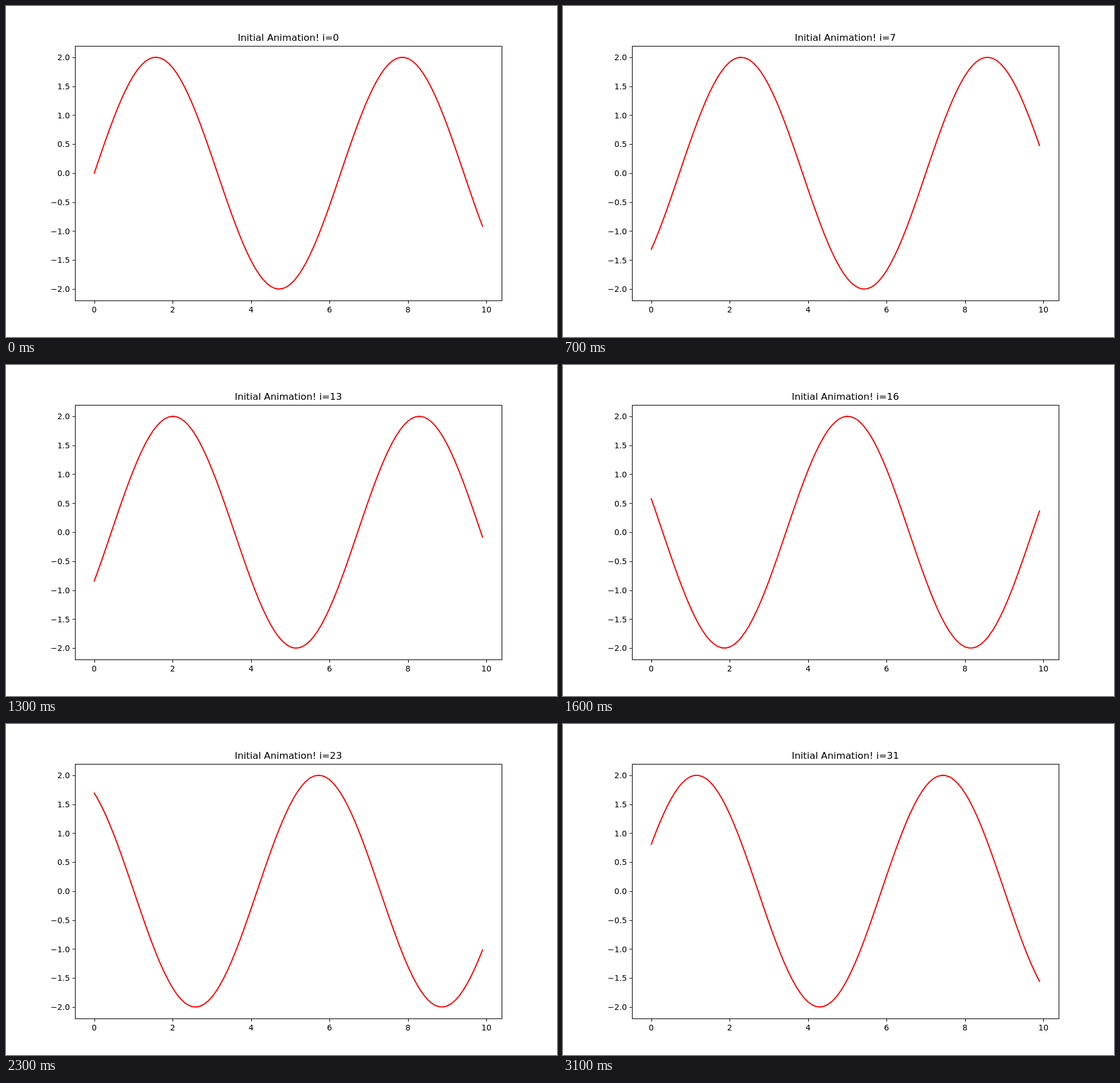
Write an HTML page that moves like this. It is 966x580 px and loops after 3.2 s.

```html
<!DOCTYPE html>
<html lang="en">
<head>
<meta charset="utf-8">
<title>Sine wave</title>
<style>
html, body { margin: 0; width: 100%; height: 100%; overflow: hidden; background: #fff; }
svg { display: block; }
text { font: 13.889px "DejaVu Sans", sans-serif; }
#title { font-size: 16.667px; }
</style>
</head>
<body>
<svg width="966" height="580" viewBox="0 0 966 580">
  <path id="curve" fill="none" stroke="#f00" stroke-width="2.083" stroke-linecap="square" stroke-linejoin="round"/>
  <path id="ticks" fill="none" stroke="#000" stroke-width="1.111"/>
  <rect x="121.5" y="70.5" width="748" height="446" fill="none" stroke="#000" stroke-width="1.111"/>
  <g id="labels"></g>
  <text id="title" x="495" y="61" text-anchor="middle"></text>
</svg>
<script>
const STEP = 100, STEPS = 32;
const box = { left: 120.75, right: 869.4, top: 69.6, bottom: 516.2 };
const xs = Array.from({ length: 100 }, (_, k) => k / 10);
const xTicks = [0, 2, 4, 6, 8, 10];
const yTicks = Array.from({ length: 9 }, (_, k) => k / 2 - 2);
const $ = id => document.getElementById(id);

// Linear scale fitted to the data with a 5% margin
function scale(values, from, to) {
  const lo = Math.min(...values), hi = Math.max(...values);
  const pad = (hi - lo) * 0.05;
  return v => from + (v - lo + pad) / (hi - lo + 2 * pad) * (to - from);
}

function addLabel(text, anchor, x, y) {
  const el = document.createElementNS("http://www.w3.org/2000/svg", "text");
  el.textContent = text;
  el.setAttribute("text-anchor", anchor);
  el.setAttribute("x", x);
  el.setAttribute("y", y);
  $("labels").append(el);
  return el;
}

const sx = scale(xs, box.left, box.right);
xTicks.forEach(v => addLabel(v, "middle", sx(v).toFixed(2), 537));
const xMarks = xTicks.map(v => `M${Math.round(sx(v)) + 0.5} 516.5v5`).join("");
const yLabels = yTicks.map(v =>
  addLabel(v.toFixed(1).replace("-", "\u2212"), "end", 112, 0));

function draw(i) {
  const ys = xs.map(x => 2 * Math.sin(x - i));
  const sy = scale(ys, box.bottom, box.top);
  $("curve").setAttribute("d", "M" + xs.map((x, k) =>
    sx(x).toFixed(2) + " " + sy(ys[k]).toFixed(2)).join("L"));
  $("ticks").setAttribute("d", xMarks + yTicks.map(v =>
    `M121.5 ${Math.round(sy(v)) + 0.5}h-5`).join(""));
  yLabels.forEach((el, k) => el.setAttribute("y", Math.round(sy(yTicks[k]) + 5.3)));
  $("title").textContent = "Initial Animation! i=" + i;
}

const start = performance.now();
let shown = -1;
function tick() {
  const i = Math.floor((performance.now() - start) / STEP) % STEPS;
  if (i !== shown) draw(shown = i);
  requestAnimationFrame(tick);
}
tick();
</script>
</body>
</html>
```
